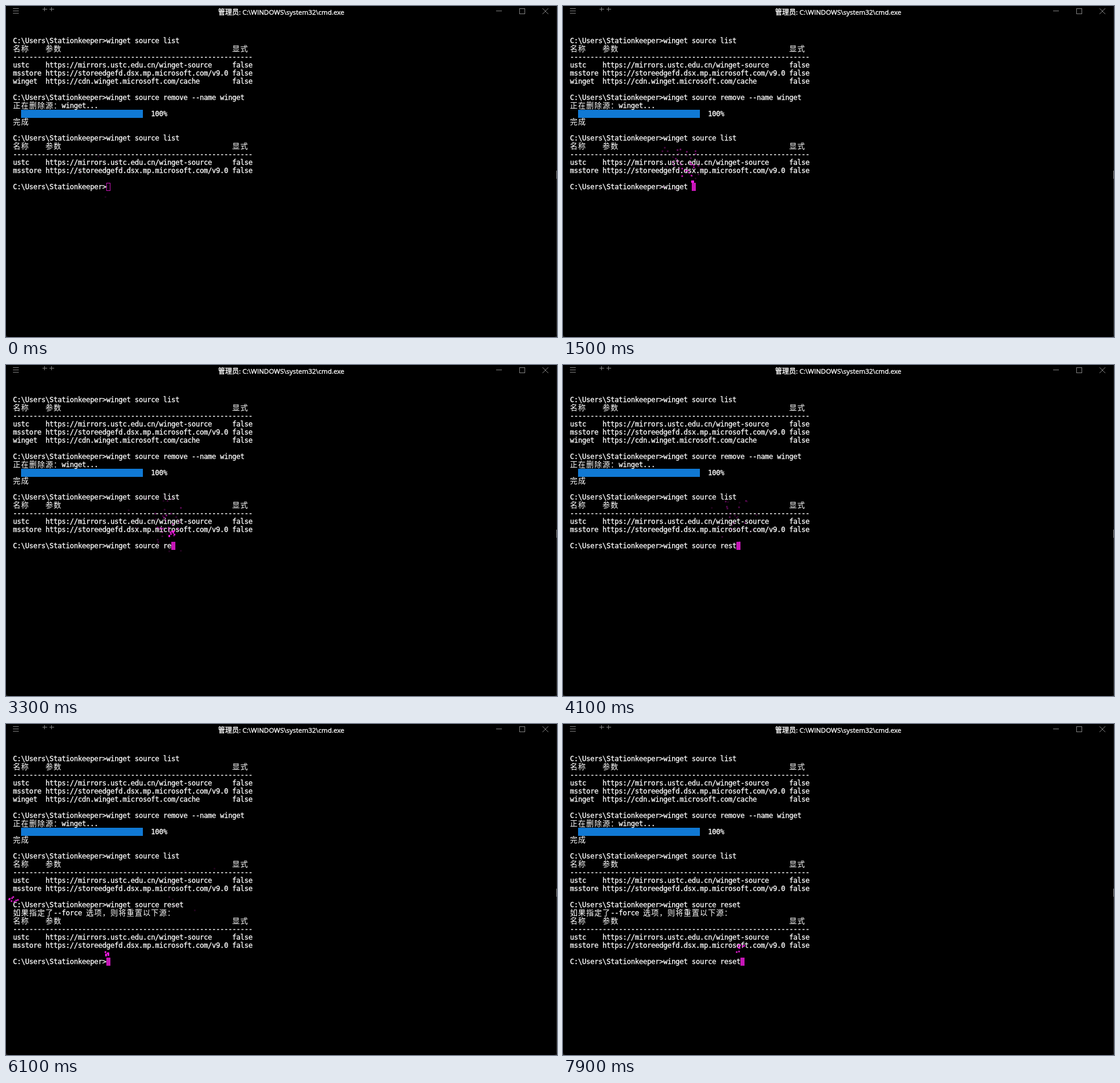
An HTML page with a canvas for the animation above (8 s loop, 950 by 571 pixels).

```html
<!DOCTYPE html>
<html lang="zh-CN">
<head>
<meta charset="utf-8">
<title>Terminal</title>
<style>
  html, body { margin: 0; width: 100%; height: 100%; overflow: hidden; background: #222; }
  #win { position: absolute; left: 0; top: 0; width: 950px; height: 571px; overflow: hidden; background: #000; border-radius: 0 0 5px 5px; }
  #title { position: absolute; left: 0; top: 0; width: 949px; line-height: 22px; text-align: center; white-space: pre;
    font-family: "Open Sans", "Noto Sans CJK SC", sans-serif; font-size: 11.5px; color: #fff; -webkit-text-stroke: .35px #fff; }
  #title i { font: 12px/0 "Noto Sans CJK SC", sans-serif; }
  svg, canvas { position: absolute; left: 0; top: 0; }
  #term { font: 12px/14px "DejaVu Sans Mono", monospace; letter-spacing: calc(7px - 1ch); color: #fff; -webkit-text-stroke: .3px #fff; }
  .row { position: absolute; left: 12px; height: 14px; white-space: pre; }
  .row i { font: 300 13px/0 "Noto Sans CJK SC", sans-serif; letter-spacing: 1px; -webkit-text-stroke: 0; }
  #bar { position: absolute; left: 26px; top: 179px; width: 210px; height: 14px; background: #1079d4; }
  #cursor { position: absolute; box-sizing: border-box; width: 7px; height: 14px; border: 1px solid #c616b7; }
  #cursor.on { background: #c616b7; }
  #edge { position: absolute; left: 949px; top: 0; width: 1px; height: 571px;
    background: linear-gradient(#1c1c1c 284px, #999 284px 298px, #383838 298px); }
</style>
</head>
<body>
<div id="win">
  <div id="edge"></div>
  <svg width="950" height="60" fill="none" stroke="#808080" shape-rendering="crispEdges">
    <path d="M12 4.5h10M12 8.5h10M12 12.5h10"/>
    <path d="M63 5.5h8M66.5 2v7M75 5.5h8M78.5 2v7"/>
    <path d="M845 8.5h10M885.5 4.5h9v9h-9z"/>
    <path d="M925 4l10 10M935 4l-10 10" shape-rendering="auto"/>
  </svg>
  <div id="title"></div>
  <div id="term"><div id="bar"></div></div>
  <div id="cursor"></div>
  <canvas id="sparks" width="950" height="571"></canvas>
</div>
<script>
const LOOP = 8000, STEP = 1000 / 60, LIFE = 56, GRAVITY = 0.075;
const LEFT = 12, TOP = 53, CW = 7, RH = 14;
const PROMPT = 'C:\\Users\\Stationkeeper>', P = PROMPT.length;
const LIST = 'winget source list', RESET = 'winget source reset', TYPO = 'winget source rest';
const $ = id => document.getElementById(id);
const wrapCjk = s => s.replace(/[\u3000-\u9fff\uff00-\uffef]+/g, '<i>$&</i>');

function row(n, text) {
  const el = document.createElement('div');
  el.className = 'row';
  el.style.top = TOP + n * RH + 'px';
  el.innerHTML = wrapCjk(text);
  $('term').append(el);
  return el;
}

function table(n, extra = []) {
  const lines = [
    '名称    参数' + ' '.repeat(42) + '显式',
    '-'.repeat(59),
    'ustc    https://mirrors.ustc.edu.cn/winget-source     false',
    'msstore https://storeedgefd.dsx.mp.microsoft.com/v9.0 false',
    ...extra
  ];
  return lines.map((s, i) => row(n + i, s));
}

row(0, PROMPT + LIST);
table(1, ['winget  https://cdn.winget.microsoft.com/cache        false']);
row(7, PROMPT + 'winget source remove --name winget');
row(8, '正在删除源：winget...');
row(9, ' '.repeat(34) + '100%');
row(10, '完成');
row(12, PROMPT + LIST);
table(13);
const firstLine = row(18, PROMPT);
const output = [row(19, '如果指定了--force 选项，则将重置以下源：'), ...table(20)];
const secondLine = row(25, PROMPT);
output.push(secondLine);

// Steady typing, then the typo is corrected
const FOCUS = 100, TYPE = 340, PACE = 190;
const BACK = 4200, FIX = 4325, LAST = 5210, ENTER = 5965, DONE = 6045, RECALL = 7765;
const keys = [
  ...[...TYPO].map((_, i) => [TYPE + i * PACE, TYPO.slice(0, i + 1)]),
  [BACK, RESET.slice(0, -2)],
  [FIX, RESET.slice(0, -1)],
  [LAST, RESET]
];

function random(seed) {
  let s = seed * 7919 + 17;
  const next = () => (s = (s * 16807) % 2147483647) / 2147483647;
  for (let i = 0; i < 4; i++) next();
  return next;
}

// Each cursor move throws five to ten sparks upwards
const bursts = [
  [-LIFE * STEP, P, 18],
  ...keys.map(([t, s]) => [t, P + s.length, 18]),
  [ENTER, 0, 19],
  [DONE, P, 25],
  [RECALL, P + RESET.length, 25]
].map(([t, col, line], i) => {
  const r = random(i + 1);
  const v = Array.from({ length: 5 + Math.round(r() * 5) }, () => [r() * 2 - 1, r() * 2 - 3.5]);
  return { t, v, x: LEFT + col * CW + 1, y: TOP + line * RH };
});

const ctx = $('sparks').getContext('2d');

function drawSparks(t) {
  ctx.clearRect(0, 0, 950, 571);
  const begun = bursts.filter(b => b.t <= t);
  begun.forEach((b, i) => {
    let n = Math.floor((t - b.t) / STEP);
    // the newest burst leaves its last faint dots in place
    if (i === begun.length - 1) n = Math.min(n, LIFE);
    if (n > LIFE) return;
    const fall = GRAVITY * n * (n + 1) / 2;
    ctx.fillStyle = `rgba(248,28,229,${0.96 ** n})`;
    for (const [vx, vy] of b.v)
      ctx.fillRect(Math.round(b.x + vx * n - 1), Math.round(b.y + vy * n + fall - 1), 3, 3);
  });
}

function setHtml(el, html) {
  if (el.shown !== html) el.innerHTML = el.shown = html;
}

function render(t) {
  let typed = '';
  for (const [at, s] of keys) if (at <= t) typed = s;
  const running = t >= ENTER && t < DONE, done = t >= DONE;
  const recalled = t >= RECALL ? RESET : '';

  setHtml(firstLine, PROMPT + typed);
  setHtml(secondLine, PROMPT + recalled);
  for (const el of output) el.style.visibility = done ? 'visible' : 'hidden';
  setHtml($('title'), wrapCjk('管理员: C:\\WINDOWS\\system32\\cmd.exe' + (running ? ' - ' + RESET : '')));

  const col = running ? 0 : P + (done ? recalled : typed).length;
  const line = running ? 19 : done ? 25 : 18;
  const cursor = $('cursor');
  cursor.style.left = LEFT + col * CW + 'px';
  cursor.style.top = TOP + line * RH + 'px';
  cursor.classList.toggle('on', t >= FOCUS);
  drawSparks(t);
}

function tick() {
  render(performance.now() % LOOP);
  requestAnimationFrame(tick);
}
tick();
</script>
</body>
</html>
```
